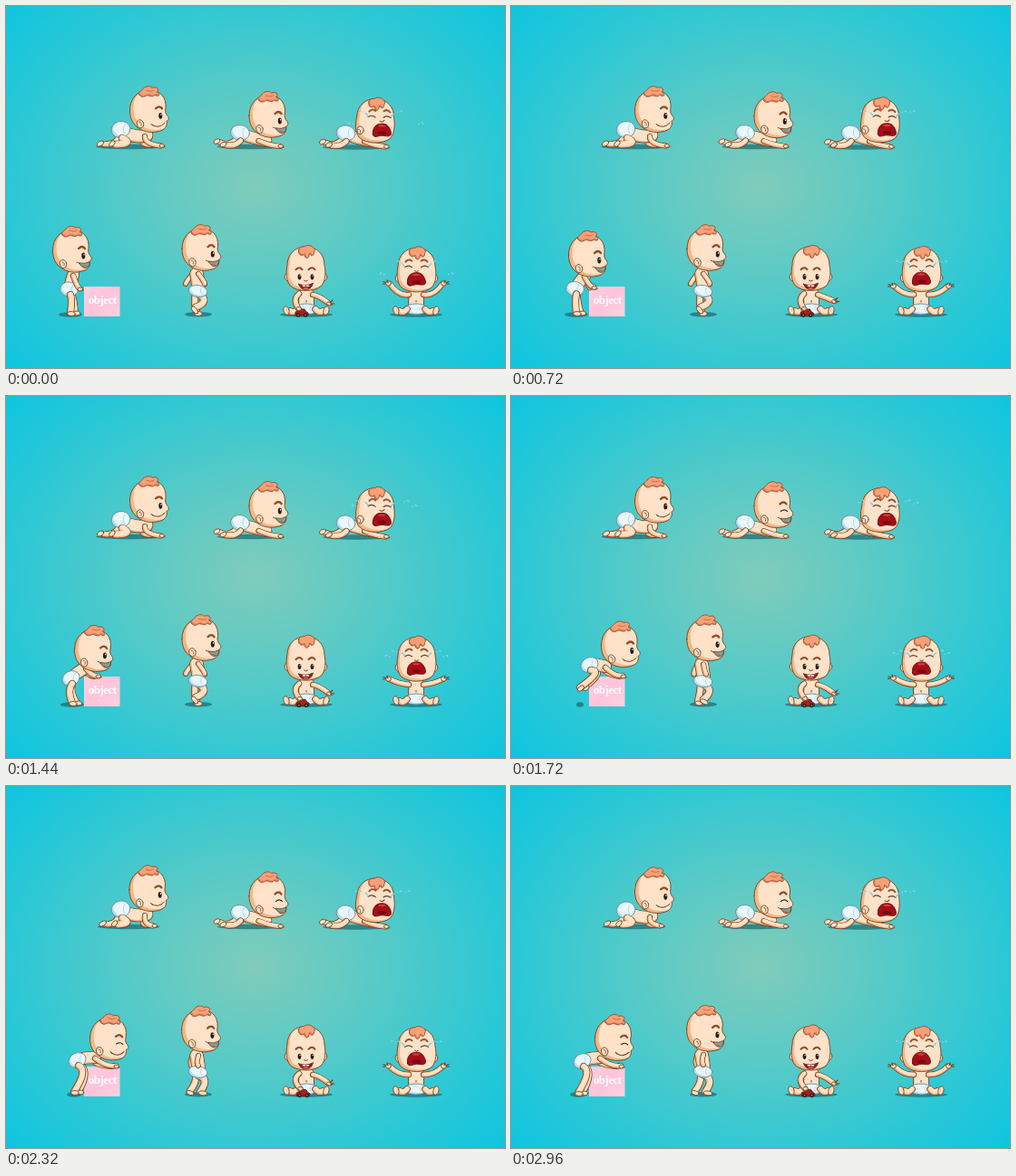
Write an HTML page with a canvas that moves like this. It is 550 px wide and 400 px high and loops after 3000 ms.

```html
<!DOCTYPE html>
<html lang="en">
<head>
<meta charset="utf-8">
<title>Baby animations</title>
<style>
html, body { margin: 0; width: 100%; height: 100%; overflow: hidden; background: #14c5de; }
canvas { display: block; width: 550px; height: 400px; }
</style>
</head>
<body>
<canvas id="stage"></canvas>
<script>
const STEP = 40, STEPS = 75, TAU = Math.PI * 2;
const LINE = '#74401f', SKIN = '#ffe2c8', SHADE = '#f4b787', HAIR = '#f6a078', DARK = '#2c1a17';
const canvas = document.getElementById('stage');
const ctx = canvas.getContext('2d');
const dpr = window.devicePixelRatio || 1;
canvas.width = 550 * dpr;
canvas.height = 400 * dpr;

const sideHead = new Path2D('M-20.5 -1C-20.5 -15 -11 -23.5 1 -23.5C13 -23.5 20 -15 19 -4C18 0 19 3 21 5C23.5 8 22 10 20 11C21.5 16 18 21.5 10 22.5C2 24.5 -8 22 -13 17C-19 12 -20.5 5 -20.5 -1Z');
const frontHead = new Path2D('M0 -24.5C12 -24.5 20.5 -16 20.5 -4C22 4 22 13 17 19C9 26 -9 26 -17 19C-22 13 -22 4 -20.5 -4C-20.5 -16 -12 -24.5 0 -24.5Z');
const tuft = new Path2D('M-10 -18C-13 -21 -7 -22 -6 -25C-3 -28 2 -28.5 4 -26C9 -28 13 -24 9 -21.5C14 -19 12 -15 7 -18C4 -14 0 -19 -3 -17C-6 -15 -9 -16 -10 -18Z');
const curl = new Path2D('M-8 -21C-6 -26 -2 -23 0 -25.5C6 -27 12 -22 9 -18C9 -14 6 -13 4 -17C3 -9 -1 -11 -2 -16C-5 -13 -9 -16 -8 -21Z');
const grin = new Path2D('M9 13Q15 14.5 20.5 11.5Q20 18 15.5 18.5Q11 18 9 13Z');
const wail = new Path2D('M-9 5C-10 -2 -6 -7 0 -7C6 -8 10 -3 11 3C11 8 6 6 1 6C-3 6 -8 10 -9 5Z');

const mix = (a, b, u) => a + (b - a) * u;
const wave = (n, period) => Math.cos(n / period * TAU);

function at(x, y, draw, turn = 0) {
  ctx.save();
  ctx.translate(x, y);
  ctx.rotate(turn);
  draw();
  ctx.restore();
}

function ink(path, fill, line = LINE, width = 0.9) {
  if (fill) { ctx.fillStyle = fill; ctx.fill(path); }
  if (line) { ctx.strokeStyle = line; ctx.lineWidth = width; ctx.stroke(path); }
}

function oval(x, y, rx, ry, fill, line = null, turn = 0) {
  const p = new Path2D();
  p.ellipse(x, y, rx, ry, turn, 0, TAU);
  ink(p, fill, line);
}

const curve = (d, width = 1, color = LINE) => ink(new Path2D(d), null, color, width);

// Solid form with a darker rim along its lower left
function form(path, light, dark, dx, dy, line = LINE) {
  ctx.save();
  ctx.clip(path);
  ctx.fillStyle = dark;
  ctx.fill(path);
  ctx.translate(dx, dy);
  ctx.fillStyle = light;
  ctx.fill(path);
  ctx.restore();
  ink(path, null, line);
}

function limb(points, width) {
  const p = new Path2D();
  const [a, b, c] = points;
  p.moveTo(...a);
  p.quadraticCurveTo(b[0] * 2 - (a[0] + c[0]) / 2, b[1] * 2 - (a[1] + c[1]) / 2, ...c);
  ctx.lineCap = ctx.lineJoin = 'round';
  ink(p, null, LINE, width + 1.6);
  ink(p, null, SHADE, width);
  at(0.5, -0.7, () => ink(p, null, SKIN, width - 1.5));
}

function foot(x, y, turn = 0, rx = 4.2) {
  oval(x, y, rx, 2.4, SKIN, LINE, turn);
}

function hand(x, y) {
  oval(x, y, 3, 2, SKIN, LINE, 0.2);
  curve(`M${x + 1} ${y + 0.7}l2 .6`, 0.7);
}

function diaper(x, y, rx, ry, turn = 0) {
  const p = new Path2D();
  p.ellipse(x, y, rx, ry, turn, 0, TAU);
  form(p, '#e9f7fd', '#b4dced', 2.2, -1.8, '#688c9d');
  curve(`M${x + rx * 0.45} ${y - ry * 0.65}q-4 ${ry * 0.6} 0 ${ry * 1.2}`, 0.8, '#a5d2e6');
}

function shadow(x, y, rx, ry = 2.8) {
  oval(x, y, rx, ry, 'rgba(20,91,99,.62)');
}

function headOfSide(x, y, mood, blink, turn = 0) {
  at(x, y, () => {
    form(sideHead, SKIN, SHADE, 4, -2.5);
    form(tuft, HAIR, '#df7c53', 1, -1.5, '#9f4a2c');
    curve('M-2 -23Q3 -21 6 -23', 0.8, '#bd6441');
    oval(-9, 14, 3.7, 4.6, SKIN, LINE, -0.3);
    curve('M-10 12q3 0 2 4', 0.8);
    curve('M8 -3Q12 -7 15 -3', 2.3, '#8f4a29');
    if (blink) curve('M9 5Q13 2 16 5', 1.2, DARK);
    else {
      oval(13.3, 5, 2, 3.4, DARK);
      oval(14, 3.7, 0.6, 0.9, '#fff');
    }
    if (mood === 'smile') {
      curve('M4 15Q11 20 18 13', 1);
      curve('M3 14l2 2', 1);
    } else {
      ink(grin, '#79a49f');
      curve('M12 16.5Q14 16 17 17.8', 1.2, '#c65b50');
      curve('M6 12q2 0 3 2', 0.9);
    }
  }, turn);
}

function cryMouth(x, y) {
  at(x, y, () => {
    ink(wail, '#a70e17', '#5f1012');
    oval(1, 3.2, 5, 2, '#7a090f');
    oval(0.5, -4.8, 4, 1.2, '#d83c3d');
  });
}

function squint(x, y, dir) {
  curve(`M${x - 4} ${y + 1}Q${x} ${y - 2} ${x + 4} ${y + 1}`, 1.2, '#5e3a31');
  curve(`M${x - 4 * dir} ${y - 6}q${4 * dir} -3 ${7 * dir} 1`, 2, '#9b542e');
  curve(`M${x + 4 * dir} ${y}l${3 * dir} -3`, 1.6, '#78d6ef');
}

function tears(n, x, y, dir, reach) {
  for (const shift of [0.25, 0.97]) {
    const u = (n / 8 + shift) % 1;
    const d = (8 + 32 * u) * reach, h = 40 * u * u - 30 * u;
    oval(x + dir * d, y + h, 1.7, 0.8, '#74d9ef', null, dir * (u - 0.4) * 1.5);
    oval(x + dir * (d - 4), y + h + 1, 0.7, 0.5, '#a6eaf5');
  }
}

function crawler(n) {
  const p = n % 6;
  const bob = [0, 0.6, 1, 0, -1, -0.5][p];
  const reach = [0, -3, -6, -8, -8, -4][p];
  shadow(136 + reach / 8, 155.5, 37 + reach / 3);
  limb([[124, 144], [119, 151], [108 - reach / 3, 152.5]], 5.5);
  foot(104 - reach / 3, 152, -0.5);
  limb([[152, 147], [151, 152], [160 + reach / 2, 154]], 4.2);
  limb([[132, 141 + bob / 2], [145, 144 + bob], [155, 143 + bob]], 13);
  diaper(126.5, 136.5 + bob / 2, 10.5, 9, -0.2);
  limb([[128, 146], [133, 151], [121 - reach / 3, 153]], 7);
  foot(117 - reach / 3, 152, -0.8, 4);
  limb([[153, 144 + bob], [157 + reach / 3, 151], [170 + reach, 154.5]], 4.6);
  hand(172 + reach, 154.5);
  headOfSide(157 + (p === 4 ? -0.6 : 0), 116.3 + bob, 'smile', false);
}

function lyingBody(x, y, bob) {
  shadow(x + 13, y + 15.5, 37);
  limb([[x - 2, y + 6], [x - 11, y + 12], [x - 21, y + 10.5]], 5);
  foot(x - 24, y + 9.5, -0.5, 3.8);
  limb([[x + 10, y + 4 + bob], [x + 21, y + 7 + bob], [x + 30, y + 9]], 12);
  diaper(x + 1.5, y, 10.5, 8.5, 0.15);
  limb([[x + 2, y + 9], [x - 5, y + 13.5], [x - 14, y + 13.5]], 5.5);
  foot(x - 17, y + 13, -0.4, 3.8);
  limb([[x + 22, y + 9 + bob], [x + 33, y + 13], [x + 45, y + 15]], 4.6);
  hand(x + 46.5, y + 15);
}

function laugher(n) {
  const p = n % 16;
  const bob = 0.45 * Math.sin(p / 8 * TAU);
  lyingBody(256.5, 140, bob / 2);
  headOfSide(288.5, 122 + bob, 'grin', p >= 7 && p <= 12);
}

function lyingCrier(n) {
  const bob = 0.4 * wave(n, 8);
  lyingBody(373, 140.5, bob / 2);
  at(407, 126.5 + bob, () => {
    form(frontHead, SKIN, SHADE, 3.5, -2.5);
    oval(-16, 11, 3.6, 4.3, SKIN, LINE);
    curve('M-18 10q3 0 2 4', 0.8);
    form(curl, HAIR, '#df7c53', 1, -1.5, '#9f4a2c');
    squint(-4, -5, -1);
    squint(13, -5, 1);
    curve('M5 0q3 2 5 -1', 1);
    cryMouth(7, 10);
  }, 0.04);
  tears(n, 398, 121, -1, 0.5);
  tears(n, 420, 121, 1, 1);
}

// step, then x and y of: head, shoulder, hip, knee, foot, hand; shadow radius
const climb = [
  [0, 72, 271, 74, 297, 70, 313, 72, 327, 71, 340, 82, 313, 13],
  [2, 96, 281, 88, 300, 72, 312, 70, 327, 73, 340, 102, 310, 13],
  [6, 113, 280, 98, 300, 79, 304, 83, 320, 74, 340, 122, 310, 9],
  [7, 113, 279.5, 98, 300, 79, 303, 84, 319, 75, 339, 122, 310, 8],
  [9, 120, 276.5, 104, 299, 87, 297, 92, 308, 76, 323, 124, 310, 4],
  [10, 121, 276, 105, 299, 88, 295, 98, 306, 78, 318, 124, 310, 0],
  [16, 126, 273, 110, 296, 95, 289, 102, 303, 80, 308, 121, 309, 0]
];

function climber(n) {
  const p = n % 17;
  const k = Math.max(1, climb.findIndex(row => row[0] >= p));
  const a = climb[k - 1], b = climb[k], u = (p - a[0]) / (b[0] - a[0]);
  const [, hx, hy, sx, sy, px, py, kx, ky, fx, fy, ax, ay, r] = a.map((v, i) => mix(v, b[i], u));
  if (r > 0.5) shadow(fx, 341, r);
  const onTop = p >= 9;
  limb([[px + 2, py + 4], [kx + 3, ky], [fx + 5, fy - 1]], 5.5);
  foot(fx + 7, fy - 0.5, onTop ? -0.8 : 0.1, 3.8);
  limb([[sx - 2, sy], [sx + 2, sy + 7], [ax - 5, ay]], 4.2);
  limb([[px, py - 1], [(px + sx) / 2, (py + sy) / 2 - 1], [sx, sy]], 12.5);
  diaper(px - 0.5, py, 10, 8, p < 2 ? 0.1 : -0.45);
  limb([[px + 1, py + 6], [kx, ky], [fx, fy - 1]], 6.5);
  foot(fx + 1, fy, onTop ? -0.7 : 0.05);
  limb([[sx, sy + 1], [(sx + ax) / 2, (sy + ay) / 2 + 3], [ax - 1, ay - 1]], 4.8);
  hand(ax, ay);
  headOfSide(hx, hy, p > 4 && p < 10 ? 'smile' : 'grin', p >= 5 && p <= 8, p > 1 && p < 9 ? 0.06 : 0);
}

function box() {
  const fill = ctx.createLinearGradient(86, 310, 125, 343);
  fill.addColorStop(0, '#ffcfe0');
  fill.addColorStop(0.5, '#ffc3d9');
  fill.addColorStop(1, '#ffd2e1');
  ctx.fillStyle = fill;
  ctx.fillRect(86, 310, 39.5, 33);
  ctx.fillStyle = '#fff';
  ctx.font = 'bold 13px "Liberation Serif", serif';
  ctx.letterSpacing = '-0.5px';
  ctx.textAlign = 'center';
  ctx.fillText('object', 106.2, 329);
}

function walker(n) {
  const p = n % 6;
  const bob = [0, 0.5, 1, 1.8, 2, 1][p];
  const spread = [0, 0.5, 0.9, 1, 0.9, 0.5][p];
  const lift = 1 - spread;
  const y = 296 + bob;
  shadow(212, 340.8, 15);
  limb([[206, y], [mix(201, 204, spread), y + 6], [mix(198, 205, spread), y + 11]], 4.5);
  limb([[209, 318 + bob], [mix(208, 208, spread), 328], [mix(210, 202, spread), 337]], 6.5);
  foot(mix(212, 202, spread), mix(340, 339, spread), spread * 0.35);
  limb([[212, 318 + bob], [mix(218, 219, spread), 326], [mix(209, 215, spread), mix(333, 338, spread)]], 7);
  foot(mix(208, 218, spread), mix(336, 339.8, spread), lift * 0.9, 4.8);
  limb([[210, y], [211.5, 305 + bob], [212, 312 + bob]], 14);
  diaper(211.5, 315 + bob / 2, 10.5, 6.5, 0.15);
  limb([[212, y], [mix(217, 210, spread), y + 7], [mix(219, 211, spread), y + 11]], 4.5);
  headOfSide(214.5 - 0.4 * spread, 269.2 + bob * 0.7, 'grin', false);
}

function sitBody(x) {
  shadow(x, 341, 29);
  limb([[x, 319], [x, 324], [x, 330]], 16);
  oval(x, 326, 7.5, 5, SKIN);
  curve(`M${x} 325.5l0 1.5`, 1);
  diaper(x, 335, 13, 6);
  for (const d of [-1, 1]) {
    limb([[x + d * 10, 335], [x + d * 14, 338], [x + d * 18, 337]], 6);
    oval(x + d * 22, 336.5, 3, 4.8, SKIN, LINE, d * 0.25);
    curve(`M${x + d * 21} 334q${d * 2} 2 0 4`, 0.7, SHADE);
  }
}

function frontFace() {
  oval(-19.5, 9, 3.8, 4.6, SKIN, LINE);
  oval(19.5, 9, 3.8, 4.6, SKIN, LINE);
  form(frontHead, SKIN, SHADE, 2.8, -2.4);
  form(curl, HAIR, '#df7c53', 1, -1.5, '#9f4a2c');
}

function player(n) {
  const p = n % 16;
  const slide = 1 - wave(p, 16);
  const up = p < 5 ? 2.5 * Math.sin(p / 4 * Math.PI) ** 2 : 0;
  sitBody(331);
  limb([[338, 319], [346, 322], [355, 328 - up]], 4.6);
  hand(356.5, 329 - up);
  curve(`M357 ${328 - up}l3 -3m-2 4l4 0`, 1.1);
  limb([[323, 318], [319, 325], [322 + slide, 334]], 5);
  at(319 + slide, 336 + slide / 3, () => {
    ink(new Path2D('M0 5V2L4 1L6 -1H10L12 2L14 3V6H0Z'), '#a91f20', '#4d1a16');
    for (const x of [3, 11]) {
      oval(x, 5.5, 2.3, 2.3, '#2b201d');
      oval(x, 5.5, 0.8, 0.8, '#d69a42');
    }
  });
  hand(323 + slide, 334.5);
  at(330.5, 290 + 0.3 * wave(p, 16), () => {
    frontFace();
    for (const x of [-7, 7]) {
      oval(x, 9, 1.9, 3.1, DARK);
      oval(x + 0.6, 7.7, 0.6, 0.8, '#fff');
      curve(`M${x - 4} 1q4 -4 7 0`, 2, '#8f4a29');
    }
    curve('M-2 13q2 2 4 0', 1);
    ink(new Path2D('M-8 17Q0 20 8 16Q6 23 0 23Q-6 23 -8 17Z'), '#901f20', '#6c271d');
    curve('M-3 19h2m2 0h2', 1.6, '#fff');
    oval(0, 21.6, 3, 0.9, '#e06b61');
  });
}

function sittingCrier(n) {
  const sway = wave(n, 8), y = 310 - 3 * sway;
  sitBody(452);
  for (const d of [-1, 1]) {
    const x = 452 + d * 29;
    limb([[452 + d * 8, 319], [452 + d * 19, 317], [x, y]], 4.8);
    oval(x + d * 1.5, y - 0.5, 3, 2.6, SKIN, LINE);
    curve(`M${x + d * 2} ${y - 1}l${d} -3m${d} 3l${d * 3} -1.5m${d * -2} 2.5l${d * 2.5} 0`, 1.1);
  }
  at(452.5, 291.3 + 0.4 * sway, () => {
    frontFace();
    squint(-9, -4, -1);
    squint(9, -4, 1);
    curve('M-2 1q2 2 4 0', 1);
    cryMouth(-1, 10);
  });
  tears(n, 446, 287, -1, 0.85);
  tears(n, 459, 287, 1, 0.85);
}

const sky = ctx.createRadialGradient(0, 0, 0, 0, 0, 1);
sky.addColorStop(0, '#80ccba');
sky.addColorStop(0.35, '#5acac6');
sky.addColorStop(0.7, '#30c8d4');
sky.addColorStop(1, '#11c5df');

function backdrop() {
  ctx.save();
  ctx.translate(275, 200);
  ctx.scale(365, 292);
  ctx.fillStyle = sky;
  ctx.fillRect(-1, -1, 2, 2);
  ctx.restore();
}

function paint(n) {
  ctx.setTransform(dpr, 0, 0, dpr, 0, 0);
  backdrop();
  crawler(n);
  laugher(n);
  lyingCrier(n);
  box();
  climber(n);
  walker(n);
  player(n);
  sittingCrier(n);
}

const start = performance.now();
function tick(now) {
  paint(Math.floor(Math.max(0, now - start) / STEP) % STEPS);
  requestAnimationFrame(tick);
}
paint(0);
requestAnimationFrame(tick);
</script>
</body>
</html>
```
